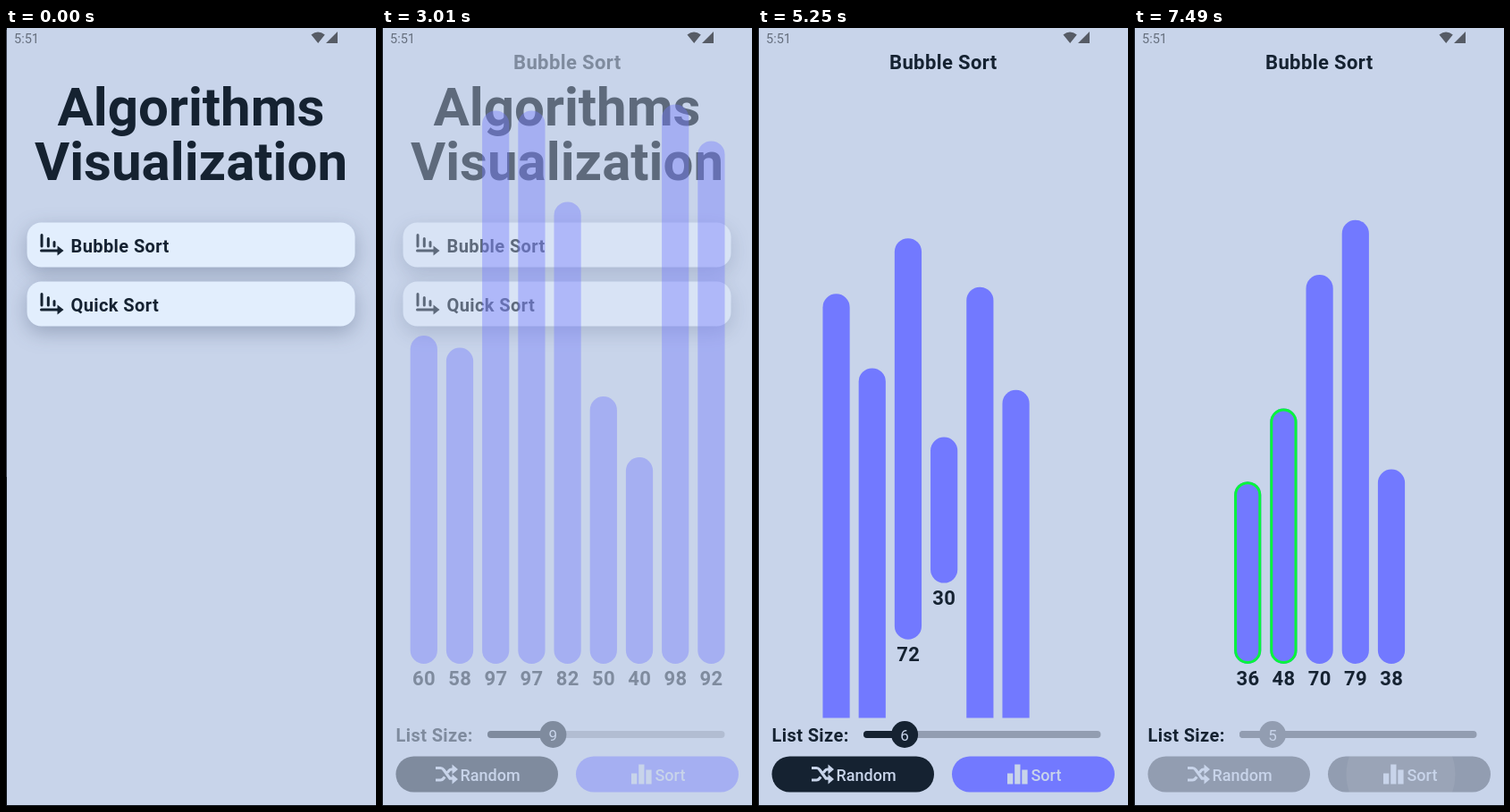
These frames come from a looping animation (414x870 px, 8 s). An HTML page:

```html
<!DOCTYPE html>
<html lang="en">
<head>
<meta charset="utf-8">
<title>Algorithms Visualization</title>
<style>
  html, body { margin: 0; width: 100%; height: 100%; overflow: hidden; background: #c8d4ea; }
  svg { position: absolute; inset: 0; width: 414px; height: 870px; font-family: Roboto, sans-serif; }
  text { fill: var(--ink); }
  svg { --ink: #152231; --paper: #c8d4ea; --accent: #7279ff; --mute: #929db1; }
  .bold { font-weight: 700; letter-spacing: .4px; }
  .mid { text-anchor: middle; }
  .card { fill: #e2eefd; filter: drop-shadow(0 7px 11px rgba(40, 55, 90, .3)); }
  .ink { fill: var(--ink); }
  .paper, .paper text { fill: var(--paper); }
  .line { fill: none; stroke: var(--ink); stroke-width: 3; stroke-linecap: round; }
  .accent { fill: var(--accent); }
  .off .ink, .off .accent { fill: var(--mute); }
</style>
</head>
<body>
<svg viewBox="0 0 414 870">
  <defs>
    <clipPath id="listClip"><rect y="60" width="414" height="711.5"/></clipPath>
    <clipPath id="sortClip"><rect x="217" y="814.5" width="182" height="40" rx="20"/></clipPath>
    <g id="listIcon">
      <path class="line" d="M40 231.5V244M47.3 235.5V244M54 239.5V244M39.5 249H58"/>
      <path class="ink" d="M57.5 243.5L64.5 249L57.5 254.5Z"/>
    </g>
  </defs>

  <g id="home">
    <g class="mid" font-size="60" font-weight="700">
      <text x="207" y="109">Algorithms</text>
      <text x="207" y="170">Visualization</text>
    </g>
    <rect class="card" x="23.5" y="217.5" width="367" height="50" rx="16"/>
    <rect class="card" x="23.5" y="283.5" width="367" height="50" rx="16"/>
    <use href="#listIcon"/>
    <use href="#listIcon" y="66"/>
    <g class="bold" font-size="20">
      <text x="72.5" y="251">Bubble Sort</text>
      <text x="72.5" y="317">Quick Sort</text>
    </g>
  </g>

  <g id="sorter">
    <text class="bold mid" x="207.3" y="46" font-size="22">Bubble Sort</text>
    <g id="bars" class="bold mid" font-size="22" clip-path="url(#listClip)"></g>
    <text class="bold" x="15.5" y="797.5" font-size="20">List Size:</text>
    <g id="controls">
      <rect x="118" y="786" width="265.5" height="8" rx="4" fill="#929db1"/>
      <rect id="track" class="ink" x="118" y="786" height="8" rx="4"/>
      <circle id="knob" class="ink" cy="790" r="15"/>
      <g class="paper mid" font-size="17"><text id="size" y="796.5"></text></g>
      <rect class="ink" x="15.5" y="814.5" width="181.5" height="40" rx="20"/>
      <rect class="accent" x="217" y="814.5" width="182" height="40" rx="20"/>
      <circle id="ripple" cx="298.5" cy="834.5" fill="#fff" opacity=".07" clip-path="url(#sortClip)"/>
      <g class="paper" font-size="18" font-weight="500">
        <path d="M60 827.5H65.5Q67.5 827.5 69 829.5L76 839.2H79M60 841H65.5Q67.5 841 69 839L70.2 837.4M73.4 832.6L75 830.4Q76 829 78 829H79"
              fill="none" stroke="#c8d4ea" stroke-width="3.2"/>
        <path d="M78.5 823.5L85 829L78.5 834.5ZM78.5 834.5L85 840L78.5 845.5Z"/>
        <text x="87.5" y="842">Random</text>
        <path d="M279 833.5h6.3v12h-6.3ZM287.2 823.5h6.3v22h-6.3ZM295.3 829.5h6.3v16h-6.3Z"/>
        <text x="305.5" y="842">Sort</text>
      </g>
    </g>
  </g>

  <g fill="#565b65">
    <text x="9" y="16.5" font-size="14.5" style="fill:#666f7e">5:51</text>
    <path d="M341.5 7.5Q349 1.5 356.8 7.5L349.2 17ZM371 4V17H358Z"/>
  </g>
  <path d="M.5 0V870M0 869.5H414" stroke="#10141b"/>
  <path id="edge" d="M.5 2V502" stroke="#3a404b"/>
</svg>
<script>
const LOOP = 8000, STEP = 70;
const FADE_START = 2790, FADE = 700, PRESS = 7350;

// Each list replaces the previous one while the bars are still springing.
const lists = [
  { at: 0,    values: [60, 58, 97, 97, 82, 50, 40, 98, 92] },
  { at: 5034, values: [98, 66, 70, 84, 86, 52, 91, 33] },
  { at: 5082, values: [53, 38, 76, 37, 56, 39, 45] },
  { at: 5202, values: [92, 90, 72, 30, 87, 80] },
  { at: 5396, values: [36, 48, 70, 79, 38] }
];

const $ = id => document.getElementById(id);
const height = v => 6.8 * v - 41;
const top_ = (list, i) => 711 - height(list.values[i]);
const left = (list, i) => 31.7 + 20.1 * (9 - list.values.length) + 40.2 * i;

// Critically damped spring response
const spring = ms => {
  const k = 0.02 * ms;
  return 1 - (1 + k) * Math.exp(-k);
};

// cubic-bezier(.4, 0, .2, 1)
function ease(x) {
  if (x <= 0 || x >= 1) return x <= 0 ? 0 : 1;
  let lo = 0, hi = 1, s;
  for (let n = 0; n < 24; n++) {
    s = (lo + hi) / 2;
    const bx = 1.2 * s * (1 - s) ** 2 + 0.6 * s * s * (1 - s) + s ** 3;
    if (bx < x) lo = s; else hi = s;
  }
  return 3 * s * s * (1 - s) + s ** 3;
}

// Sum of the spring responses to every target change so far
function place(pos, shown, i, t) {
  let p = pos(shown[0], i);
  for (let k = 1; k < shown.length; k++)
    p += (pos(shown[k], i) - pos(shown[k - 1], i)) * spring(t - shown[k].at);
  return p;
}

function drawBars(shown, t, sorting) {
  $('bars').innerHTML = shown.at(-1).values.map((v, i) => {
    const x = place(left, shown, i, t), y = place(top_, shown, i, t), h = height(v);
    const ring = sorting && i < 2
      ? `<rect x="${x + 1.5}" y="${y + 1.5}" width="27.2" height="${h - 3}" rx="13.5" fill="none" stroke="#08f53c" stroke-width="3"/>`
      : '';
    return `<rect class="accent" x="${x}" y="${y}" width="30.2" height="${h}" rx="15.1"/>${ring}
      <text x="${x + 15.3}" y="${y + h + 24}">${v}</text>`;
  }).join('');
}

function render(time) {
  const t = Math.floor(time % LOOP / STEP) * STEP;
  const fade = ease((t - FADE_START) / FADE);
  const shown = lists.filter(l => l.at <= t);
  const n = shown.at(-1).values.length;
  const knobX = 109.5 + 9.1 * n;
  const sorting = t >= PRESS + STEP;

  $('home').style.opacity = 1 - fade;
  $('sorter').style.opacity = fade;
  $('edge').style.opacity = t < 700 ? 1 : 0;
  drawBars(shown, t, sorting);
  $('track').setAttribute('width', knobX - 118);
  $('knob').setAttribute('cx', knobX);
  $('size').setAttribute('x', knobX);
  $('size').textContent = n;
  $('controls').setAttribute('class', sorting ? 'off' : '');
  $('ripple').setAttribute('r', t < PRESS ? 0 : Math.min(61, 35 + (t - PRESS) / STEP * 13));
}

let start;
function frame(now) {
  start ??= now;
  render(now - start);
  requestAnimationFrame(frame);
}
render(0);
requestAnimationFrame(frame);
</script>
</body>
</html>
```
